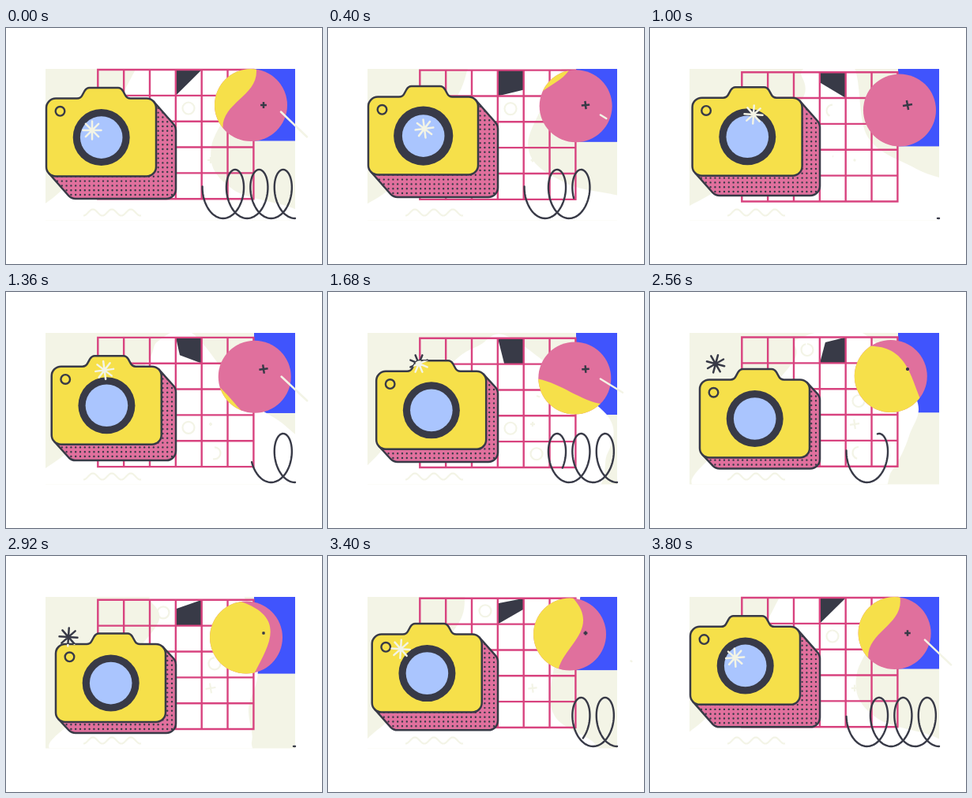
Animation, 400 px wide and 300 px high, one loop 3840 ms. Source, as an HTML page with a canvas:

```html
<!DOCTYPE html>
<html lang="en">
<head>
<meta charset="utf-8">
<title>Camera loop</title>
<style>
  html, body { margin: 0; width: 100%; height: 100%; overflow: hidden; background: #fff; }
  canvas { display: block; width: 400px; height: 300px; }
</style>
</head>
<body>
<canvas id="stage"></canvas>
<script>
const LOOP = 3840, STEP = 40, TAU = Math.PI * 2, DEG = Math.PI / 180;
const INK = '#383a47', CREAM = '#f3f4e6', YELLOW = '#f6e04a', PINK = '#e0709d',
      RULE = '#d8437f', BLUE = '#4054fd', GLASS = '#aac5fe';

const canvas = document.getElementById('stage');
const c = canvas.getContext('2d');
const dpr = window.devicePixelRatio || 1;
canvas.width = 400 * dpr;
canvas.height = 300 * dpr;

// Shared pose times; a track holds one value per time.
const KEYS = [0, 400, 1000, 1680, 2200, 2920];
const N = KEYS.length;
const keyTime = i => KEYS[((i % N) + N) % N] + Math.floor(i / N) * LOOP;

// Periodic smooth interpolation through a track.
function track(t, ...v) {
  let i = N - 1;
  while (KEYS[i] > t) i--;
  const val = k => v[((k % N) + N) % N];
  const slope = k => (val(k + 1) - val(k - 1)) / (keyTime(k + 1) - keyTime(k - 1));
  const d = keyTime(i + 1) - keyTime(i), u = (t - keyTime(i)) / d;
  const u2 = u * u, u3 = u2 * u;
  return (2 * u3 - 3 * u2 + 1) * val(i) + (u3 - 2 * u2 + u) * d * slope(i)
       + (3 * u2 - 2 * u3) * val(i + 1) + (u3 - u2) * d * slope(i + 1);
}

const clamp = x => Math.min(1, Math.max(0, x));
const ease = (t, a, b) => (1 - Math.cos(Math.PI * clamp((t - a) / (b - a)))) / 2;

function stroke(color, width) {
  c.strokeStyle = color;
  c.lineWidth = width;
  c.stroke();
}
function fill(color) {
  c.fillStyle = color;
  c.fill();
}
function disc(x, y, r) {
  c.beginPath();
  c.arc(x, y, r, 0, TAU);
}
function spokes(x, y, r, count, turn, color, width) {
  c.beginPath();
  for (let i = 0; i < count; i++) {
    const a = turn + i * Math.PI / count, dx = r * Math.cos(a), dy = r * Math.sin(a);
    c.moveTo(x - dx, y - dy);
    c.lineTo(x + dx, y + dy);
  }
  stroke(color, width);
}

// Corners of the white patch, each on its own orbit:
// x, swing, phase, y, swing, phase, sideways pulse
const PATCH = [
  [190, 4, 90, 51, 18, 180, 0],
  [168, 0, 0, 91, 5, 150, 23],
  [84, 5, 0, 197, 0, 0, 12],
  [56, 10, 270, 252, 0, 0, 0],
  [335, 66, 47, 272, 16, 30, 0],
  [354, 48, 67, 222, 18, -46, 0],
  [322, 37, 160, 186, 20, -17, 0],
  [297, 44, 213, 139, 11, 0, 0],
  [274, 45, -21, 44, 14, 180, 0]
];

function backdrop(a, lift) {
  c.save();
  c.beginPath();
  c.rect(50, 52, 316, 192.5);
  fill(CREAM);
  c.clip();
  c.fillStyle = BLUE;
  c.fillRect(314, 52, 52, 91.5 + 6.5 * lift);

  const pts = PATCH.map(([x, rx, px, y, ry, py, pulse]) => [
    x + rx * Math.cos(a - px * DEG) - pulse * Math.cos(2 * a),
    y + ry * Math.cos(a - py * DEG)
  ]);
  const at = i => pts[(i + pts.length) % pts.length];
  c.beginPath();
  c.moveTo(...pts[0]);
  pts.forEach((p, i) => {
    const o = at(i - 1), q = at(i + 1), z = at(i + 2);
    c.bezierCurveTo(p[0] + (q[0] - o[0]) / 6, p[1] + (q[1] - o[1]) / 6,
                    q[0] - (z[0] - p[0]) / 6, q[1] - (z[1] - p[1]) / 6, q[0], q[1]);
  });
  fill('#fff');
  c.restore();

  c.beginPath();
  for (let x = 98; x <= 171; x++) c.lineTo(x, 234.5 + 4 * Math.cos((x - 98) / 24 * TAU));
  stroke(CREAM, 2.2);
}

// Rings draw on, hold and wipe off over one shared lifetime.
function ring(t, x, y, born) {
  const age = (t - born + LOOP) % LOOP;
  const from = ease(age, 1200, 1600), to = ease(age, 0, 400);
  if (to - from < 0.002) return;
  c.beginPath();
  c.arc(x, y, 7.5, (from - 0.25) * TAU, (to - 0.25) * TAU);
  stroke(CREAM, 2.2);
}

function grid(t, wave, drop) {
  const left = 116.3, top = 53 + drop, size = 32.85;
  ring(t, 231, top + 49, 3420);
  ring(t, 231, top + 114.5, 960);
  ring(t, 264, top + 81, 1600);
  ring(t, 264, top + 147, 1150);
  ring(t, 199, top + 16, 2210);
  spokes(259, 168, 4 - 2.5 * wave, 2, 0.15 * wave, CREAM, 2.2);

  const cell = (x, y) => c.lineTo(215 + clamp(x) * size, top + clamp(y) * size);
  c.beginPath();
  cell(track(t, 0, 0, 0, 0, 0.38, 0), track(t, 0, 0, 0, 0, 0, 0.35));
  cell(1, 0);
  cell(1, track(t, 0, 0.76, 1, 1, 1, 1));
  cell(track(t, 0, 0, 0, 0.25, 0, 0), track(t, 1, 1, 0.4, 1, 1, 1));
  fill(INK);

  c.beginPath();
  for (let i = 0; i <= 6; i++) {
    c.moveTo(left + i * size, top);
    c.lineTo(left + i * size, top + 5 * size);
  }
  for (let i = 0; i <= 5; i++) {
    c.moveTo(left - 1.2, top + i * size);
    c.lineTo(left + 6 * size + 1.2, top + i * size);
  }
  stroke(RULE, 2.4);
}

function ball(t, a, wave, lift) {
  const r = 46;
  c.save();
  c.translate(310 + 6 * wave, 98 + 6 * lift);
  disc(0, 0, r);
  fill(PINK);
  c.clip();
  c.rotate(track(t, 207, 219, 160, 111, 106, 169) * DEG);
  const edge = track(t, 16, 41, 62, 18, -7, -2);
  const mid = edge - track(t, 0, 0, 0, 0, 0, 39);
  const bend = 14 + 8 * Math.cos(a);
  c.beginPath();
  c.moveTo(edge, r);
  c.bezierCurveTo(mid - bend, 15, mid + bend, -15, edge, -r);
  c.lineTo(120, -r);
  c.lineTo(120, r);
  fill(YELLOW);
  c.restore();

  spokes(326, 98, 3.9 + 2.2 * wave, 2, -0.18 * Math.max(0, wave), INK, 2.5);
}

// Shrinks to its near end, later grows back from its far end; twice per loop.
function stick(t, a) {
  const near = t < 1480 ? 1 - ease(t, 1000, 1400) : 1 - ease(t, 3360, 3760);
  const first = t < 1000, third = t >= 1480 && t < 3360;
  const from = first || third ? 0 : near;
  const to = first ? 1 - ease(t, 0, 560) : third ? 1 - ease(t, 1480, 2040) : 1;
  if (to - from < 0.01) return;
  const tilt = (35 + 9 * Math.cos(3 * a)) * DEG;
  const end = k => c.lineTo(364.5 + 46 * (k - 0.5) * Math.cos(tilt), 122.5 + 46 * (k - 0.5) * Math.sin(tilt));
  c.beginPath();
  end(from);
  end(to);
  stroke(CREAM, 2.5);
}

function coil(t) {
  const h = t % 1920, first = -0.3, span = 3.3;
  const from = first + span * (h < 960 ? 0 : 1 - ease(h, 960, 1920));
  const to = first + span * (h < 960 ? 1 - ease(h, 0, 960) : 1);
  if (to - from < 0.002) return;
  c.beginPath();
  const n = Math.ceil((to - from) * 60);
  for (let i = 0; i <= n; i++) {
    const u = from + (to - from) * i / n;
    c.lineTo(274.8 + 30.4 * u + 18 * Math.sin(u * TAU), 211 + 31 * Math.cos(u * TAU));
  }
  stroke(INK, 2.4);
}

const W = 139, H = 99, R = 12, K = R * Math.SQRT1_2;

function casing(x, y) {
  return new Path2D(`M${x + R} ${y}h27q4.5 0 6.5 -4l3 -5.5q2.5 -4 6 -4h36.5q3.5 0 6 4l3 5.5q2 4 6.5 4`
    + `H${x + W - R}a${R} ${R} 0 0 1 ${R} ${R}V${y + H - R}a${R} ${R} 0 0 1 ${-R} ${R}`
    + `H${x + R}a${R} ${R} 0 0 1 ${-R} ${-R}V${y + R}a${R} ${R} 0 0 1 ${R} ${-R}z`);
}

function camera(t, a) {
  const bx = 76, by = track(t, 217, 215, 213, 216, 222, 225) - H;
  const push = ease(t, 520, 2080) - ease(t, 2900, 3780);
  const x = bx - 25 + 12 * push, y = by - 28.5 + 14.5 * push;

  // Extruded side
  c.save();
  c.beginPath();
  c.moveTo(x + W - R + K, y + R - K);
  c.arc(bx + W - R, by + R, R, -Math.PI / 4, 0);
  c.arc(bx + W - R, by + H - R, R, 0, Math.PI / 2);
  c.arc(bx + R, by + H - R, R, Math.PI / 2, Math.PI * 3 / 4);
  c.lineTo(x + R - K, y + H - R + K);
  c.closePath();
  fill(PINK);
  stroke(INK, 2.5);
  c.clip();
  c.beginPath();
  for (let dy = H - 5; dy > -30; dy -= 5.8)
    for (let dx = W - 5; dx > -26; dx -= 5.8) {
      c.moveTo(bx + dx + 1.2, by + dy);
      c.arc(bx + dx, by + dy, 1.2, 0, TAU);
    }
  fill(INK);
  c.restore();

  // The sparkle is dark behind the body and pale on top of it.
  const sx = track(t, 109, 122, 131, 115, 94, 79);
  const sy = track(t, 130, 128, 110, 91, 83, 103);
  const sparkle = color => spokes(sx, sy, 11.5, 4, a, color, 2.5);
  sparkle(INK);

  const body = casing(x, y);
  c.fillStyle = YELLOW;
  c.fill(body);
  c.strokeStyle = INK;
  c.lineWidth = 2.5;
  c.stroke(body);
  disc(x + 17.5, y + 16.3, 5.8);
  stroke(INK, 2.4);
  const lx = x + 69.7, ly = y + 49.6;
  disc(lx, ly, 36 + 1.6 * (ease(t, 160, 400) - ease(t, 400, 800)));
  fill(INK);
  disc(lx, ly, 26.8);
  fill(GLASS);

  c.save();
  c.clip(body);
  sparkle(CREAM);
  c.restore();
}

function draw(t) {
  const a = t / LOOP * TAU, wave = Math.sin(a), lift = 1 - Math.cos(a);
  c.setTransform(dpr, 0, 0, dpr, 0, 0);
  c.fillStyle = '#fff';
  c.fillRect(0, 0, 400, 300);
  c.lineCap = 'butt';
  c.lineJoin = 'round';
  backdrop(a, lift);
  grid(t, wave, 3 * lift);
  ball(t, a, wave, lift);
  c.lineCap = 'round';
  stick(t, a);
  coil(t);
  camera(t, a);
}

let start = null;
function tick(now) {
  if (start === null) start = now;
  const t = Math.max(0, now - start) % LOOP;
  draw(Math.floor(t / STEP) * STEP);
  requestAnimationFrame(tick);
}
draw(0);
requestAnimationFrame(tick);
</script>
</body>
</html>
```
